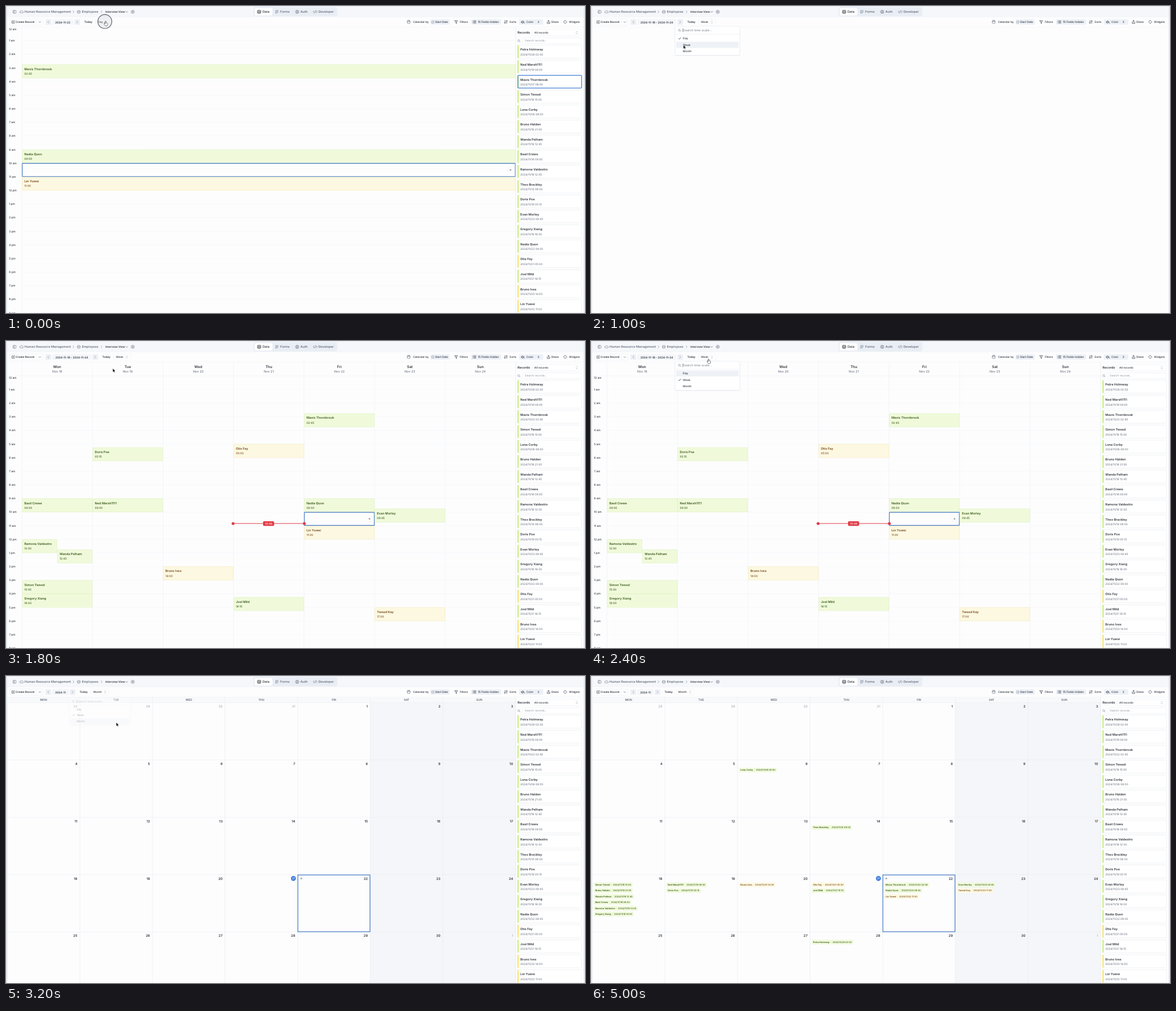
These frames come from a looping animation (1027x545 px, 5.1 s). An HTML page:

```html
<!DOCTYPE html>
<html lang="en">
<head>
<meta charset="utf-8">
<title>Calendar time scales</title>
<style>
html, body { margin: 0; width: 100%; height: 100%; overflow: hidden; background: #fdfdfe; }
svg { display: block; width: 100%; height: 100%; font-family: Inter, "Liberation Sans", sans-serif; text-rendering: geometricPrecision; }
text { white-space: pre; }
</style>
</head>
<body>
<svg id="stage" viewBox="0 0 1027 545"></svg>
<script>
const LOOP = 5100, STEP = 100;
const INK = '#30343c', MUTED = '#596172', LINE = '#edeff3', BLUE = '#4478c4';
const GREEN = { fill: '#f0fadb', edge: '#def2bb', ink: '#3c5a1c', bar: '#c9ef7c' };
const YELLOW = { fill: '#fdf8e1', edge: '#f6ebb5', ink: '#75481c', bar: '#f8e46c' };
const stage = document.getElementById('stage');

// name, day of November, start time, colour
const records = [
  ['Petra Holmway', 28, '02:00'], ['Ned Marsh1111', 19, '09:00'], ['Mavis Thornbrook', 22, '02:45'],
  ['Simon Tweed', 18, '15:00'], ['Lena Corby', 6, '08:00'], ['Bruno Halden', 18, '21:00'],
  ['Wanda Pelham', 18, '12:45'], ['Basil Crewe', 18, '09:00'], ['Ramona Valdestro', 18, '12:00'],
  ['Theo Brackley', 14, '08:00'], ['Doris Poe', 19, '05:15'], ['Evan Morley', 23, '09:45'],
  ['Gregory Xiang', 18, '16:00'], ['Nadia Quon', 22, '09:00'], ['Otis Fay', 21, '05:00', YELLOW],
  ['Joel Mild', 21, '16:15'], ['Bruno Ives', 20, '14:00', YELLOW], ['Lin Yuwei', 22, '11:00', YELLOW],
  ['Tweed Kay', 23, '17:00', YELLOW]
].map(([name, day, time, tone = GREEN]) => {
  const [h, m] = time.split(':').map(Number);
  const date = `2024/11/${String(day).padStart(2, '0')} ${time}`;
  return { name, day, time, tone, date, hour: h + m / 60 };
});

const range = (n, f) => Array.from({ length: n }, (_, i) => f(i)).join('');
const group = (id, body, hidden) => `<g id="${id}"${hidden ? ' display="none"' : ''}>${body}</g>`;
const text = (x, y, s, size = 4.85, fill = INK, weight = 500, anchor = 'start') =>
  `<text x="${x}" y="${y + size * 0.36}" font-size="${size}" fill="${fill}" font-weight="${weight}" text-anchor="${anchor}">${s}</text>`;
const mid = (x, y, s, size, fill, weight) => text(x, y, s, size, fill, weight, 'middle');
const box = (x, y, w, h, fill = 'none', stroke = 'none', r = 0, sw = 0.6) =>
  `<rect x="${x}" y="${y}" width="${w}" height="${h}" rx="${r}" fill="${fill}" stroke="${stroke}" stroke-width="${sw}"/>`;
const path = (d, stroke = INK, sw = 0.7, fill = 'none') =>
  `<path d="${d}" stroke="${stroke}" stroke-width="${sw}" fill="${fill}" stroke-linecap="round" stroke-linejoin="round"/>`;
const ring = (x, y, r, stroke = MUTED, sw = 0.7, fill = 'none') =>
  `<circle cx="${x}" cy="${y}" r="${r}" stroke="${stroke}" stroke-width="${sw}" fill="${fill}"/>`;
const right = (x, y, c = '#8a92a0') => path(`M${x - 1} ${y - 2}l2 2l-2 2`, c);
const left = (x, y, c) => path(`M${x + 1} ${y - 2}l-2 2l2 2`, c);
const down = (x, y, c = MUTED) => path(`M${x - 1.8} ${y - 0.9}l1.8 1.8l1.8-1.8`, c);
const upDown = (x, y) => path(`M${x - 1.3} ${y - 1}l1.3-1.3l1.3 1.3m-2.6 2l1.3 1.3l1.3-1.3`, '#9299a5', 0.6);
const glass = (x, y) => ring(x - 0.4, y - 0.4, 1.7, '#747c8a', 0.6) + path(`M${x + 0.9} ${y + 0.9}l1.3 1.3`, '#747c8a', 0.6);
const cross = (x, y, r = 1.6, c = MUTED) => path(`M${x - r} ${y}h${2 * r}M${x} ${y - r}v${2 * r}`, c, 0.6);
const plus = (x, y, s = 9) => box(x - s / 2, y - s / 2, s, s, '#fff', '#eceef2', 1.5) + cross(x, y);

function topBar() {
  const tab = (x, s, active) => text(x, 10.3, s, 5.6, active ? INK : MUTED);
  return box(0, 0, 1027, 20, '#f5f7fa') + box(0, 0, 1027, 0.8, '#e2e6ec') +
    box(12.5, 7.8, 5.2, 5, 'none', MUTED, 1) + path('M14.4 7.8v5', MUTED, 0.6) +
    path('M25.8 12.2a1.5 1.5 0 0 1 .1-3a2 2 0 0 1 3.6 .4a1.3 1.3 0 0 1 0 2.6z', MUTED, 0.6) +
    text(32.8, 10.3, 'Human Resource Management', 5.6, MUTED) + right(119.7, 10.3) +
    box(126.8, 8, 4.6, 4.8, 'none', MUTED, 1, 0.6) + path('M126.8 10.3h4.6', MUTED, 0.6) +
    text(134.5, 10.3, 'Employees', 5.6, MUTED) + right(169.5, 10.3) +
    text(176.2, 10.5, 'Interview View', 4.85, INK, 600) + down(214, 10.5) +
    ring(224.8, 10.3, 2.8, MUTED, 0.6) + cross(224.8, 10.3, 1.3) +
    box(439, 2, 148.5, 16.4, '#e9eef5', 'none', 3) + box(441, 3.7, 31.5, 13, '#fff', 'none', 2.5) +
    box(446.2, 7.6, 5.6, 5.4, 'none', INK, 0.8, 0.8) + path('M446.2 9.3h5.6M449 9.3v3.7M446.2 11.2h5.6', INK, 0.6) + tab(455, 'Data', true) +
    path('M478 8.2h4.6M478 10.3h2.4M478 12.4h2M483 9.6l-2 2.7', MUTED) + tab(486.3, 'Forms') +
    ring(516.5, 10.3, 2.8) + ring(516.5, 9.6, 0.9, MUTED, 0.6) + path('M514.7 12.2q1.8-1.7 3.6 0', MUTED, 0.6) + tab(522.3, 'Auth') +
    path('M546.4 8.8l-1.6 1.5l1.6 1.5M550.6 8.8l1.6 1.5l-1.6 1.5M549.3 8l-1.6 4.6', MUTED) + tab(554.2, 'Developer');
}

function toolBar() {
  const y = 28.3, chip = (x, w) => box(x, 23.4, w, 9.8, '#edf1f7', 'none', 1.5);
  return box(2, 20, 1023, 17.2, '#fdfdfe') + box(2, 36.9, 1023, 0.5, LINE) +
    box(7, 23, 58.5, 11, '#fff', '#e8ebf0', 2) + path('M54.3 23v11', '#e8ebf0', 0.6) +
    path('M12.4 26.2h-2v4.6h4.6v-2M12.2 29l.3-1.3l2.3-2.3l.9 .9l-2.3 2.3z', INK, 0.6) +
    text(17, 28.6, 'Create Record', 4.85, INK, 600) + down(60, 28.6) +
    box(711.8, 26, 5, 5, 'none', MUTED, 0.8) + path('M711.8 27.8h5M713.2 25v1.5M715.4 25v1.5', MUTED, 0.6) + text(722, y, 'Calendar by') +
    chip(753, 34) + box(755.2, 26.7, 3.6, 3.6, 'none', MUTED, 0.5, 0.5) + text(761, y, 'Start Date') +
    path('M796 26h5.2l-2 2.5v2.6l-1.2-.7v-1.9z') + text(805, y, 'Filters') +
    chip(825, 53) + path('M829.5 26.4h4M829.5 28.3h4M829.5 30.2h4M828 26.4h.1M828 28.3h.1M828 30.2h.1') + text(837, y, '15 Fields hidden') +
    path('M885 25.8v5l-1.3-1.3M885 30.8l1.3-1.3M888.1 30.8v-5l-1.3 1.3M888.1 25.8l1.3 1.3') + text(893, y, 'Sorts') +
    chip(910, 43) + path('M914 28.4l2.4-2.4l2.5 2.5l-2.4 2.3zM914 28.4h4.5M919.6 29.8v.7', INK, 0.7) + text(923, y, 'Color') + mid(944.3, y, '3') +
    path('M960 28.5v2.5h4.6v-2.5M962.3 29.4v-3.8M960.9 26.8l1.4-1.3l1.4 1.3') + text(967, y, 'Share') +
    path('M992 25.4l2.8 3l-2.8 2.8l-2.8-2.8z') + text(998.8, y, 'Widgets');
}

// Date range and scale picker: right arrow x, Today x, picker x, picker width
function scaleBar(dates, next, today, x, w, label) {
  const y = 28.6, arrow = (ax, icon) => box(ax - 5, 23.4, 10, 10.2, '#edf0f5', 'none', 1.5) + icon(ax, y, '#8a92a0');
  return arrow(75, left) + box(82, 23.4, next - 89, 10.2, '#f4f6f9', 'none', 1.5) +
    mid((75 + next) / 2, 28.9, dates, 4.85, INK, 600) + arrow(next, right) +
    mid(today, y, 'Today', 4.85, INK, 600) + box(x, 23.2, w, 10.6, '#fff', '#eceef2', 1.5) +
    text(x + 4, y, label) + upDown(x + w - 6.5, y);
}

const HOUR = 24.17, COL = 125.1, LEFT = 28.3;
const hourName = h => `${h % 12 || 12} ${h < 12 ? 'am' : 'pm'}`;
const hours = top => range(22, h =>
  (h ? path(`M${LEFT} ${top + h * HOUR}H904`, '#f1f2f5', 0.5) : '') +
  text(5.3, top + h * HOUR + (h ? 0 : 3.7), hourName(h)));

function event(r, x, w, top) {
  const y = top + r.hour * HOUR;
  return box(x + 0.4, y + 0.3, w - 0.8, HOUR - 0.5, r.tone.fill, r.tone.edge, 0.8) +
    text(x + 4.2, y + 8, r.name, 5.55, r.tone.ink, 600) + text(x + 4.2, y + 16.4, r.time, 4.85, r.tone.ink);
}

const DAY_TOP = 37.3, WEEK_TOP = 62;
const slot = (x, w, top) => {
  const y = top + 10 * HOUR;
  return box(x + 0.5, y + 0.4, w - 1, HOUR - 0.8, '#fdfdfe', BLUE, 0.5, 1.2) + plus(x + w - 9, y + 12);
};

function dayView() {
  return hours(DAY_TOP) + path(`M${LEFT} 37V545`, LINE, 0.6) +
    records.filter(r => r.day === 22).map(r => event(r, LEFT, 875.5, DAY_TOP)).join('') + slot(LEFT, 875.5, DAY_TOP);
}

function weekGrid() {
  const names = ['Mon', 'Tue', 'Wed', 'Thu', 'Fri', 'Sat', 'Sun'];
  return hours(WEEK_TOP) + path(`M2 ${WEEK_TOP}H904`, LINE, 0.6) + names.map((n, i) => {
    const x = LEFT + i * COL;
    return path(`M${x} 37V545`, LINE, 0.6) + mid(x + COL / 2, 45.6, n, 6.4, INK, 600) +
      mid(x + COL / 2, 54.4, `Nov ${18 + i}`, 5.5, MUTED, 400);
  }).join('');
}

function weekEvents(match) {
  return records.filter(r => r.day >= 18 && r.day <= 23 && match(r)).map(r => {
    const half = r.day === 18 && Math.floor(r.hour) === 12;
    const x = LEFT + (r.day - 18) * COL + (half && r.hour > 12 ? COL / 2 : 0);
    return event(r, x, half ? COL / 2 : COL, WEEK_TOP);
  }).join('');
}

function nowLine() {
  const red = '#e03b46', y = 324;
  return path(`M403 ${y}H529`, red, 1.1) + ring(402.8, y, 2.6, 'none', 0, red) + ring(529.2, y, 2.6, 'none', 0, red) +
    box(456, y - 4, 19.5, 8.2, red, 'none', 1.8) + mid(465.8, y, '10:49', 4.85, '#fff');
}

const CELL_W = 128.8, CELL_H = 101.8, MONTH_TOP = 47.2;
const cellX = i => 2.2 + (i % 7) * CELL_W, cellY = i => MONTH_TOP + Math.floor(i / 7) * CELL_H;

function monthGrid() {
  const names = ['MON', 'TUE', 'WED', 'THU', 'FRI', 'SAT', 'SUN'];
  return box(2, 37.2, 902, 10, '#f8f9fb') +
    box(cellX(5), MONTH_TOP, CELL_W * 2, 500, '#f5f6f9') +
    names.map((n, i) => mid(cellX(i) + CELL_W / 2, 42.3, n, 4.95, MUTED, 600)).join('') +
    range(8, i => path(`M${2.2 + i * CELL_W} ${i ? 37.2 : MONTH_TOP}V545`, '#e6e9ee', 0.6)) +
    range(5, i => path(`M2 ${MONTH_TOP + i * CELL_H}H904`, '#e6e9ee', 0.6)) +
    range(35, i => {
      const day = i < 4 ? 28 + i : i > 33 ? 1 : i - 3, outside = i < 4 || i > 33;
      const x = cellX(i) + CELL_W - 4.4, y = cellY(i) + 6.8;
      if (i === 24) return ring(x - 3.2, y, 4.3, 'none', 0, '#3a78dc') + mid(x - 3.2, y, 21, 5, '#fff');
      return text(x, y, day, 5.9, outside ? '#a0a5ae' : INK, outside ? 400 : 600, 'end');
    }) +
    box(cellX(25) + 0.3, cellY(25) + 0.6, CELL_W - 0.9, CELL_H - 1, 'none', BLUE, 0, 1.2) + plus(cellX(25) + 6.4, cellY(25) + 6.9, 6.5);
}

function monthEvents() {
  const used = {};
  return records.map(r => {
    const i = r.day + 3, row = used[i] = (used[i] ?? -1) + 1;
    const x = cellX(i) + 2.7, y = cellY(i) + 18 + row * 10.42;
    const label = `${r.name} <tspan font-weight="500"> ·  ${r.date}</tspan>`;
    return `<g class="chip">${box(x, y - 4.1, 60, 8.2, r.tone.fill, 'none', 1.4)}${text(x + 2.5, y, label, 4.03, r.tone.ink, 600)}</g>`;
  }).join('');
}

function sideBar() {
  return box(904, 37.3, 121, 508, '#fdfdfe') + path('M904 37.3V545', '#e6e9ee', 0.7) +
    text(907.3, 47.2, 'Records', 5.55, INK, 600) + box(933, 41.8, 87.5, 10.8, '#fff', LINE, 1.5) +
    text(937, 47.2, 'All records') + upDown(1012.5, 47.2) +
    glass(909.8, 61.8) + box(916.8, 56.6, 103.7, 10, '#fff', LINE, 1.5) +
    text(920.3, 61.6, 'Search records...', 4.85, '#8b919c', 400) +
    records.slice(0, 18).map((r, i) => {
      const y = 69.8 + i * 26.57, late = r.name === records[2].name;
      const date = s => text(912.3, y + 16.4, s, 4.85, MUTED, 400);
      return box(907.5, y, 113.3, 22.8, '#fff', '#e9ebef', 1.2) + box(907.2, y, 2.2, 22.8, r.tone.bar, 'none', 0.8) +
        text(912.3, y + 7.6, r.name, 5.55, INK, 600) +
        (late ? group('dateNew', date(r.date)) + group('dateOld', date('2024/11/07 08:00') +
          box(908, y + 0.2, 113, 22.4, 'none', '#4582d6', 1.2, 1.3)) : date(r.date));
    }).join('');
}

const ITEM_Y = [57.7, 69, 80.2];
function menu() {
  return `<g fill="#26324a">${box(-57.9, 36.6, 115.8, 52.4, 'rgba(40,50,70,.05)', 'none', 3)}</g>` +
    box(-57.5, 36, 115, 51.6, '#fff', '#e3e6eb', 2) + glass(-49.5, 43.2) +
    text(-43.4, 43.2, 'Search time scale...', 5.55, '#7d8490', 400) + path('M-43.6 40.3v5.8', INK, 0.5) +
    path('M-57.5 50.2H57.5', '#e8ebf0', 0.6) + group('hover', box(-55.5, -5.4, 111, 10.8, '#eef2f7', 'none', 1)) +
    ['Day', 'Week', 'Month'].map((s, i) => text(-43.4, ITEM_Y[i], s, 4.9)).join('') +
    group('check', path('M-51 .2l1.2 1.2l2.4-2.9', INK, 0.8));
}

const arrow = path('M0 0V6.6L1.6 5.2L2.7 7.6L3.9 7.1L2.8 4.8L4.9 4.7Z', '#fff', 0.5, '#111');
const hand = path('M-.8 3.7V.3Q-.8-.5 0-.5T.8 .3V2.4Q3.3 2.5 3.5 3.5V5.2Q3.3 7 2.4 7.6H-.4Q-1.3 6.6-2.6 4.5Q-2-0-.8 3.7Z', '#222', 0.6, '#fff');

stage.innerHTML = box(0, 0, 1027, 545, '#fdfdfe') +
  group('day', dayView()) +
  group('week', weekGrid() +
    group('weekHover', box(153.4, 62, COL, HOUR, '#f4f5f7') + plus(270, 74)) +
    group('weekMost', weekEvents(r => r.day !== 23) + slot(528.7, COL, WEEK_TOP) + nowLine()) +
    group('weekRest', weekEvents(r => r.day === 23))) +
  group('month', monthGrid() + group('monthEvents', monthEvents()) + group('monthHover', plus(137.4, 54.2, 6.5))) +
  group('side', sideBar()) + topBar() + toolBar() +
  group('bar0', scaleBar('2024-11-22', 126.3, 146, 159, 25, 'Day')) +
  group('bar1', scaleBar('2024-11-18 - 2024-11-24', 158.2, 178, 191, 30, 'Week')) +
  group('bar2', scaleBar('2024-11', 118, 137.6, 151, 31.5, 'Month')) +
  box(0, 0, 2.2, 545, '#e4e8ee') + box(1024.6, 0, 2.4, 545, '#e4e8ee') +
  group('menu', menu()) +
  group('click', ring(175.3, 27.6, 12.4, '#5b5f68', 1.2, 'rgba(190,195,205,.22)')) +
  group('cursor', group('arrow', arrow) + group('hand', hand));

const el = Object.fromEntries([...stage.querySelectorAll('[id]')].map(n => [n.id, n]));
const show = (id, on) => el[id].setAttribute('display', on ? 'inline' : 'none');
const move = (id, x, y) => el[id].setAttribute('transform', `translate(${x} ${y})`);

function fitChips() {
  for (const chip of stage.querySelectorAll('.chip'))
    chip.firstChild.setAttribute('width', chip.lastChild.getComputedTextLength() + 5);
}

// Pointer stops: time, x, y
const stops = [[0, 176.5, 27.5], [200, 176.5, 27.5], [800, 163.8, 69.5], [1000, 163.8, 69.5],
  [1300, 170, 65], [1500, 170, 65], [2100, 208.6, 32.5], [2400, 208.6, 32.5], [2900, 195.4, 82.5], [LOOP, 195.4, 82.5]];
function pointer(t) {
  const i = stops.findIndex(s => s[0] > t), [t0, x0, y0] = stops[i - 1], [t1, x1, y1] = stops[i];
  const p = (t - t0) / (t1 - t0), k = p * p * (3 - 2 * p);
  return [x0 + (x1 - x0) * k, y0 + (y1 - y0) * k];
}

function menuOpacity(t) {
  if (t < 100 || t > 1100 && t < 2200 || t > 3200) return 0;
  if (t === 100 || t === 2200) return 0.6;
  return t === 1100 || t === 3200 ? 0.3 : 1;
}

function render(time) {
  const t = Math.floor(time / STEP) * STEP;
  const scale = t < 1000 ? 0 : t < 3100 ? 1 : 2;
  const [x, y] = pointer(t);
  show('day', scale === 0);
  show('week', scale === 1 && t >= 1100);
  show('weekHover', t >= 1200 && y > 62 && t < 2400);
  show('weekMost', t >= 1300);
  show('weekRest', t >= 1600);
  show('month', t >= 3200);
  show('monthEvents', t >= 3400);
  show('monthHover', t >= 3300 && t < 4600);
  show('side', t !== 1000 && t !== 3100);
  show('dateOld', t < 100);
  show('dateNew', t >= 100);
  for (let i = 0; i < 3; i++) show('bar' + i, i === scale);

  const alpha = menuOpacity(t), zoom = alpha < 1 ? 0.95 : 1;
  const cx = [171.5, 206.5, 166.7][scale];
  show('menu', alpha > 0);
  el.menu.setAttribute('opacity', alpha);
  el.menu.setAttribute('transform', `translate(${cx} ${zoom < 1 ? 63 : 62}) scale(${zoom}) translate(0 -62)`);
  move('hover', 0, ITEM_Y[y < 63 ? 0 : y < 74.5 ? 1 : 2]);
  move('check', 0, ITEM_Y[t < 1200 ? 0 : 1]);

  const overButton = y < 35;
  show('click', t < 100);
  show('cursor', t < 4600);
  show('hand', overButton);
  show('arrow', !overButton);
  move('cursor', x, y);
}

fitChips();
document.fonts.ready.then(fitChips);
const start = performance.now();
function tick() {
  render((performance.now() - start) % LOOP);
  requestAnimationFrame(tick);
}
render(0);
requestAnimationFrame(tick);
</script>
</body>
</html>
```
